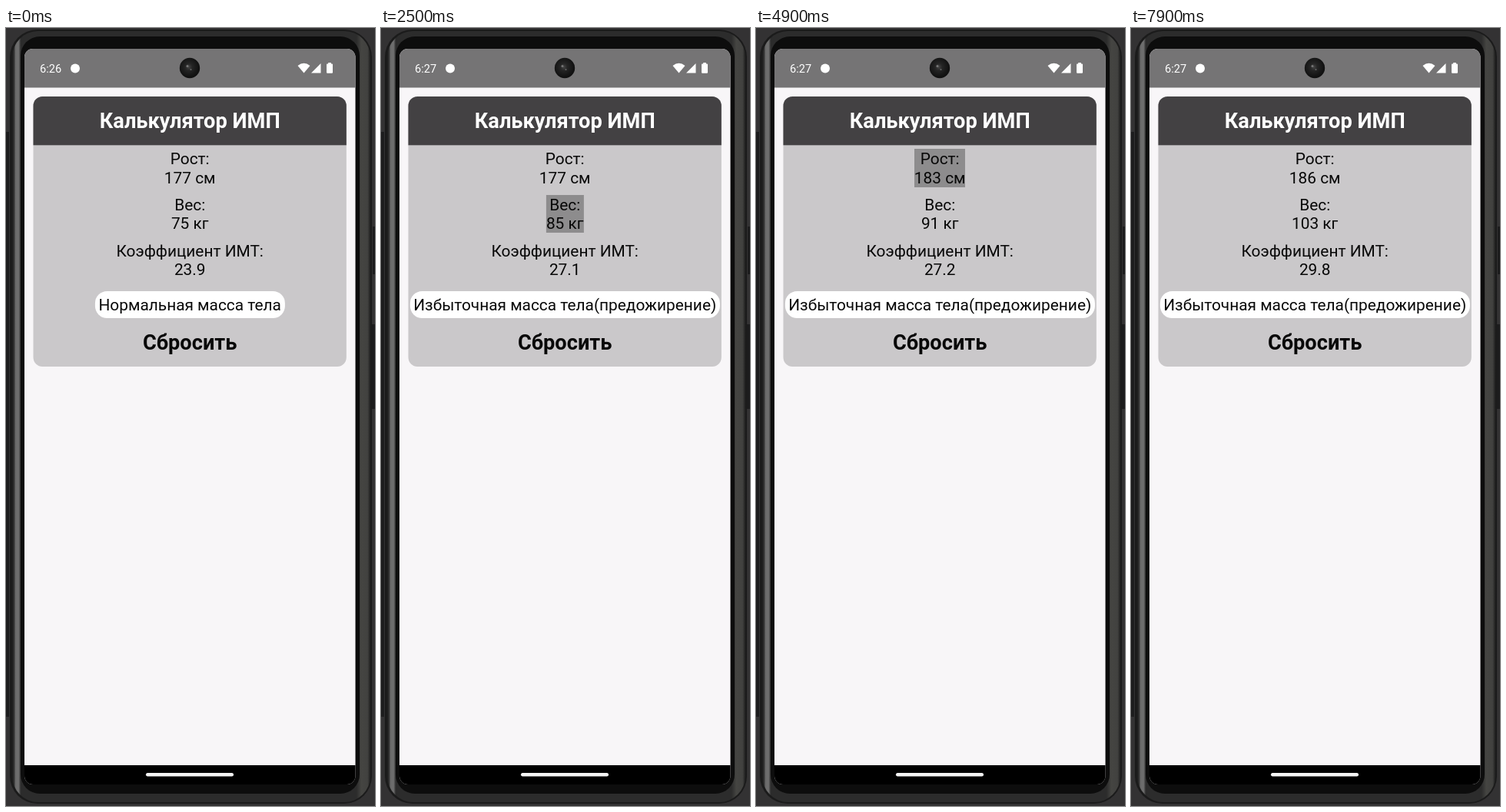
An HTML page that plays this animation: 480x1011 px, repeating every 8000 ms.

```html
<!DOCTYPE html>
<html lang="ru">
<head>
<meta charset="utf-8">
<title>Калькулятор</title>
<style>
  html, body { margin: 0; width: 100%; height: 100%; overflow: hidden; background: #333233; }
  svg { display: block; width: 100%; height: 100%; }
  text { font: 20.85px Roboto, sans-serif; text-anchor: middle; fill: #080808; }
  .big { font-size: 27.2px; font-weight: 700; }
  #clock { font-size: 14.6px; text-anchor: start; fill: #fff; }
</style>
</head>
<body>
<svg viewBox="0 0 480 1011" preserveAspectRatio="none">
  <defs>
    <linearGradient id="rim" gradientUnits="userSpaceOnUse" x1="0" x2="480">
      <stop offset=".017" stop-color="#1c1c1c"/>
      <stop offset=".022" stop-color="#333"/>
      <stop offset=".026" stop-color="#696969"/>
      <stop offset=".034" stop-color="#707070"/>
      <stop offset=".04" stop-color="#2c2c2c"/>
      <stop offset=".95" stop-color="#2c2c2c"/>
      <stop offset=".963" stop-color="#454542"/>
      <stop offset=".98" stop-color="#41413f"/>
      <stop offset=".988" stop-color="#1c1c1c"/>
    </linearGradient>
    <radialGradient id="lens" cx=".45" cy=".45">
      <stop offset="0" stop-color="#454545"/>
      <stop offset=".35" stop-color="#252525"/>
      <stop offset="1" stop-color="#111"/>
    </radialGradient>
    <clipPath id="screen"><rect x="24" y="27" width="430.5" height="956" rx="11"/></clipPath>
    <clipPath id="card"><rect x="35.500" y="89" width="407.300" height="351" rx="12"/></clipPath>
  </defs>

  <!-- phone body -->
  <rect width="480" height="1011" fill="#333233"/>
  <path d="M0 135h4v760H0zM477 258h3v62h-3zM476 385h4v110h-4z" fill="#1c1c1d"/>
  <rect x="5" y="2" width="471" height="1006" rx="36" fill="#1b1b1b"/>
  <rect x="8" y="4" width="466" height="1002" rx="34" fill="url(#rim)"/>
  <rect x="19" y="11" width="441" height="984" rx="25" fill="#0d0d0d"/>

  <!-- screen -->
  <g clip-path="url(#screen)">
    <rect x="24" y="27" width="431" height="956" fill="#f8f6f8"/>
    <rect x="24" y="27" width="431" height="50.5" fill="#757475"/>
    <rect x="24" y="958" width="431" height="26"/>
    <rect x="182" y="968" width="114" height="4.5" rx="2.2" fill="#f4f4f4"/>
  </g>
  <text id="clock" x="44" y="58"></text>
  <g fill="#fff">
    <circle cx="90" cy="52.5" r="6"/>
    <path d="M379.500 49Q387.500 42.500 395.500 49L387.500 58.500ZM397 58.500L409.500 46V58.500ZM417 47.500Q417 46.500 418 46.500H419.200V45H422.800V46.500H424Q425 46.500 425 47.500V57.500Q425 58.800 424 58.800H418Q417 58.800 417 57.500Z"/>
  </g>
  <circle cx="239" cy="52" r="13.2" fill="url(#lens)"/>
  <circle cx="236" cy="49.5" r="1.5" fill="#777"/>
  <circle cx="240.500" cy="54" r="1.100" fill="#666"/>

  <!-- calculator -->
  <g clip-path="url(#card)">
    <rect x="35" y="89" width="409" height="351" fill="#cac8ca"/>
    <rect x="35" y="89" width="409" height="63.300" fill="#434143"/>
  </g>
  <text class="big" x="239.200" y="130" style="fill:#fff">Калькулятор ИМП</text>
  <rect id="heightPress" x="206" y="157" width="66" height="50"/>
  <rect id="weightPress" y="217" height="49"/>
  <g>
    <text x="239.200" y="177">Рост:</text>
    <text x="239.200" y="201.500" id="height"></text>
    <text x="239.200" y="236.800">Вес:</text>
    <text x="239.200" y="261.300" id="weight"></text>
    <text x="239.200" y="296.500">Коэффициент ИМТ:</text>
    <text x="239.200" y="321" id="index"></text>
  </g>
  <rect id="pill" y="342" height="35" rx="15.700" fill="#fff"/>
  <text x="239.200" y="366.500" id="verdict"></text>
  <text class="big" x="239.200" y="417.500">Сбросить</text>
</svg>
<script>
  const LOOP = 8000, STEP = 100, CENTER = 239.4;
  const $ = id => document.getElementById(id);

  // Bursts of taps: the press begins, the first value lands, then one more per period.
  const bursts = [
    { field: 'weight', press: 800, first: 870, period: 173, taps: 16, release: 3500 },
    { field: 'height', press: 3800, first: 3950, period: 165, taps: 9, release: 5300 },
    { field: 'weight', press: 6100, first: 6050, period: 160, taps: 12, release: 7900 }
  ];

  const tapsAt = (b, t) =>
    Math.max(0, Math.min(b.taps, Math.floor((t - b.first) / b.period) + 1));

  function setWidth(id, width) {
    $(id).setAttribute('x', CENTER - width / 2);
    $(id).setAttribute('width', width);
  }

  function render(t) {
    const value = { height: 177, weight: 75 };
    const press = { height: 0, weight: 0 };
    for (const b of bursts) {
      value[b.field] += tapsAt(b, t);
      if (t >= b.press && t < b.release) press[b.field] = t < b.press + STEP ? 0.18 : 0.3;
    }
    const index = value.weight / (value.height / 100) ** 2;
    const over = index >= 25;

    $('clock').textContent = t < 2500 ? '6:26' : '6:27';
    $('height').textContent = value.height + ' см';
    $('weight').textContent = value.weight + ' кг';
    $('index').textContent = index.toFixed(1);
    $('verdict').textContent = over ? 'Избыточная масса тела(предожирение)' : 'Нормальная масса тела';
    $('heightPress').setAttribute('opacity', press.height);
    $('weightPress').setAttribute('opacity', press.weight);
    setWidth('weightPress', value.weight > 99 ? 61 : 49);
    setWidth('pill', over ? 403 : 247);
  }

  function tick() {
    const t = performance.now() % LOOP;
    render(Math.floor(t / STEP) * STEP);
    requestAnimationFrame(tick);
  }
  tick();
</script>
</body>
</html>
```
